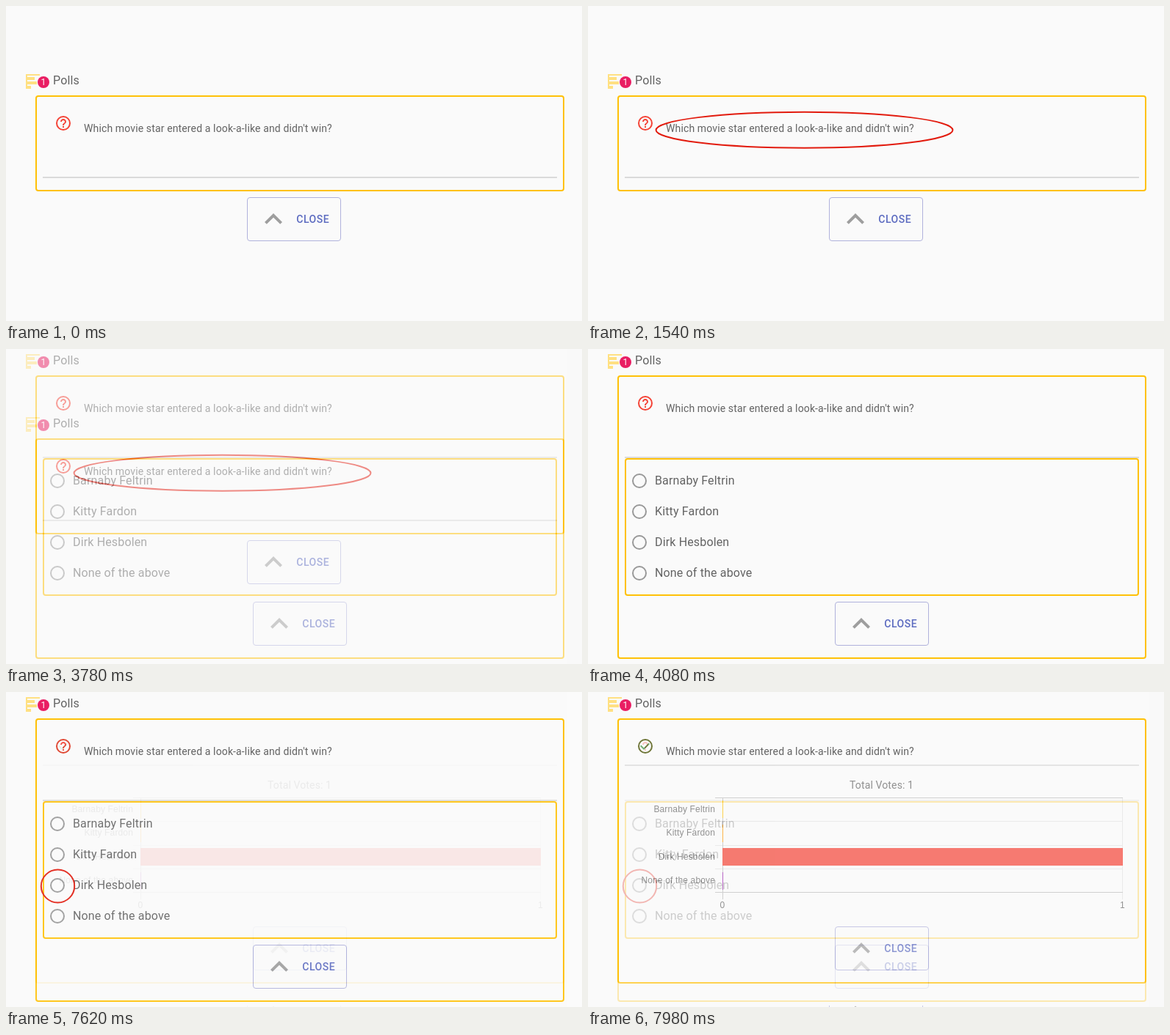
Recreate the animation shown at these times as an HTML page. Size 784x430 px, loop 8000 ms.

```html
<!DOCTYPE html>
<html lang="en">
<head>
<meta charset="utf-8">
<title>Poll</title>
<style>
  html, body { margin: 0; width: 100%; height: 100%; overflow: hidden; background: #fafafa; }
  svg { display: block; width: 784px; height: 430px; }
  text { font-family: Roboto, sans-serif; font-size: 16px; letter-spacing: .009375em; fill: #636363; }
  .small { font-size: 14px; }
  .page { fill: #fafafa; }
  .frame { fill: none; stroke: #ffc107; stroke-width: 2; }
  .rule { fill: #dadada; }
  .mark { fill: none; stroke: #e21b0e; stroke-width: 2; }
  .radio { fill: none; stroke: #999; stroke-width: 2; }
  .close text { font-size: 14px; font-weight: 500; letter-spacing: .5px; fill: #5c6bc0; }
  .outline { fill: none; stroke: #b0b2dc; }
  .chevron { fill: #9e9e9e; }
  .chart text { font-family: "Liberation Sans", Arial, sans-serif; font-size: 12px; letter-spacing: .15px; fill: #666; }
  .names { text-anchor: end; }
  .ticks { text-anchor: middle; }
  .grid { fill: none; stroke: #e2e2e2; }
  .axis { fill: none; stroke: #bdbdbd; }

  /* Each layer fades in over ten 60 ms steps; 1 ms lead keeps step edges exact. */
  .fade { opacity: 0; animation: 8s linear -1ms infinite; }
  #ask { animation-name: ask; }
  #options { animation-name: options; }
  #pick { animation-name: pick; }
  #result { animation-name: result; animation-timing-function: step-end; }
  @keyframes ask {
    0% { opacity: 0; }
    12.5% { opacity: 0; animation-timing-function: steps(10, start); }
    20%, 100% { opacity: 1; }
  }
  @keyframes options {
    0% { opacity: 0; }
    44.25% { opacity: 0; animation-timing-function: steps(10, start); }
    51.75%, 100% { opacity: 1; }
  }
  @keyframes pick {
    0% { opacity: 0; }
    63.5% { opacity: 0; animation-timing-function: steps(10, start); }
    71%, 100% { opacity: 1; }
  }
  @keyframes result {
    0% { opacity: 0; }
    95.25% { opacity: .1; }
    96% { opacity: .2; }
    96.75% { opacity: .3; }
    97.5% { opacity: .4; }
    98.25% { opacity: .5; }
    99% { opacity: .6; }
    99.75%, 100% { opacity: .7; }
  }
</style>
</head>
<body>
<svg viewBox="0 0 784 430">
  <defs>
    <g id="head">
      <path fill="#ffe082" d="M27 7h19v2h-17v2h10v4h-10v2h13v4h-13v2h5v4h-7z"/>
      <circle cx="51" cy="18" r="8" fill="#e91e63"/>
      <text x="51" y="22" text-anchor="middle" style="font-size:12px;fill:#fff">1</text>
      <text x="64" y="21">Polls</text>
      <text class="small" x="106" y="86">Which movie star entered a look-a-like and didn't win?</text>
    </g>
    <g id="help">
      <circle cx="78" cy="74" r="9" fill="none" stroke="#f44336" stroke-width="2"/>
      <path fill="#f44336" d="M77 80h2v-2h-2zM78 68c-2.21 0-4 1.79-4 4h2c0-1.1.9-2 2-2s2 .9 2 2c0 2-3 1.75-3 5h2c0-2.25 3-2.5 3-5 0-2.21-1.79-4-4-4z"/>
    </g>
    <g id="close" class="close">
      <rect class="outline" x=".5" y=".5" width="127" height="59" rx="3.5"/>
      <path class="chevron" d="M36 22L24 34l2.8 2.8L36 27.7l9.2 9.1L48 34z"/>
      <text x="67.3" y="35">CLOSE</text>
    </g>
  </defs>

  <rect class="page" width="784" height="430"/>
  <g transform="translate(0 86)">
    <use href="#head"/>
    <use href="#help"/>
    <rect class="rule" x="50" y="147" width="700" height="2"/>
    <rect class="frame" x="41" y="37" width="718" height="129" rx="3"/>
  </g>
  <use href="#close" x="328" y="261"/>
  <ellipse id="ask" class="fade mark" cx="294.5" cy="169.2" rx="202" ry="24.5"/>

  <g id="options" class="fade">
    <rect class="page" width="784" height="430"/>
    <use href="#head"/>
    <use href="#help"/>
    <rect class="rule" x="50" y="147" width="700" height="2"/>
    <rect class="frame" x="41" y="37" width="718" height="385" rx="3"/>
    <rect class="frame" x="51" y="150" width="698" height="186" rx="3"/>
    <g id="choices"></g>
    <use href="#close" x="336" y="345"/>
  </g>
  <ellipse id="pick" class="fade mark" cx="70.5" cy="265" rx="22.7" ry="22.4"/>

  <g id="result" class="fade">
    <rect class="page" width="784" height="430"/>
    <use href="#head"/>
    <g fill="none" stroke="#388e3c" stroke-width="2">
      <circle cx="78" cy="74" r="9"/>
      <path d="M71.7 73.3L76 77.6l7.3-7.3"/>
    </g>
    <rect class="rule" x="50" y="99" width="700" height="2"/>
    <rect class="frame" x="41" y="37" width="718" height="360" rx="3"/>
    <text class="small" x="356" y="132">Total Votes: 1</text>
    <g class="chart">
      <path class="grid" d="M173 176.5H728M173 209.5H728M173 241.5H728M727.5 144V283"/>
      <path class="axis" d="M173 144.5H728M173 273.5H728M183.5 144V283"/>
      <rect x="183" y="148" width="1" height="24" fill="#ffc107"/>
      <rect x="183" y="181" width="1" height="24" fill="#ff9800"/>
      <rect x="183" y="213" width="545" height="24" fill="#f44336"/>
      <rect x="183" y="246" width="1" height="24" fill="#9c27b0"/>
      <g id="names" class="names"></g>
      <g class="ticks">
        <text x="183" y="295">0</text>
        <text x="727.5" y="295">1</text>
      </g>
    </g>
    <use href="#close" x="336" y="320"/>
    <path class="outline" d="M328.5 428v2M455.5 428v2"/>
    <path class="chevron" d="M364 428.5l-1.5 1.5h3z"/>
  </g>
</svg>
<script>
  const answers = ["Barnaby Feltrin", "Kitty Fardon", "Dirk Hesbolen", "None of the above"];
  const fill = (id, row) => {
    document.getElementById(id).innerHTML = answers.map(row).join("");
  };
  fill("choices", (name, i) => {
    const y = 180 + i * 42;
    return `<circle class="radio" cx="70" cy="${y}" r="9"/><text x="91" y="${y + 5}">${name}</text>`;
  });
  fill("names", (name, i) => `<text x="173" y="${164 + i * 32.4}">${name}</text>`);
</script>
</body>
</html>
```
